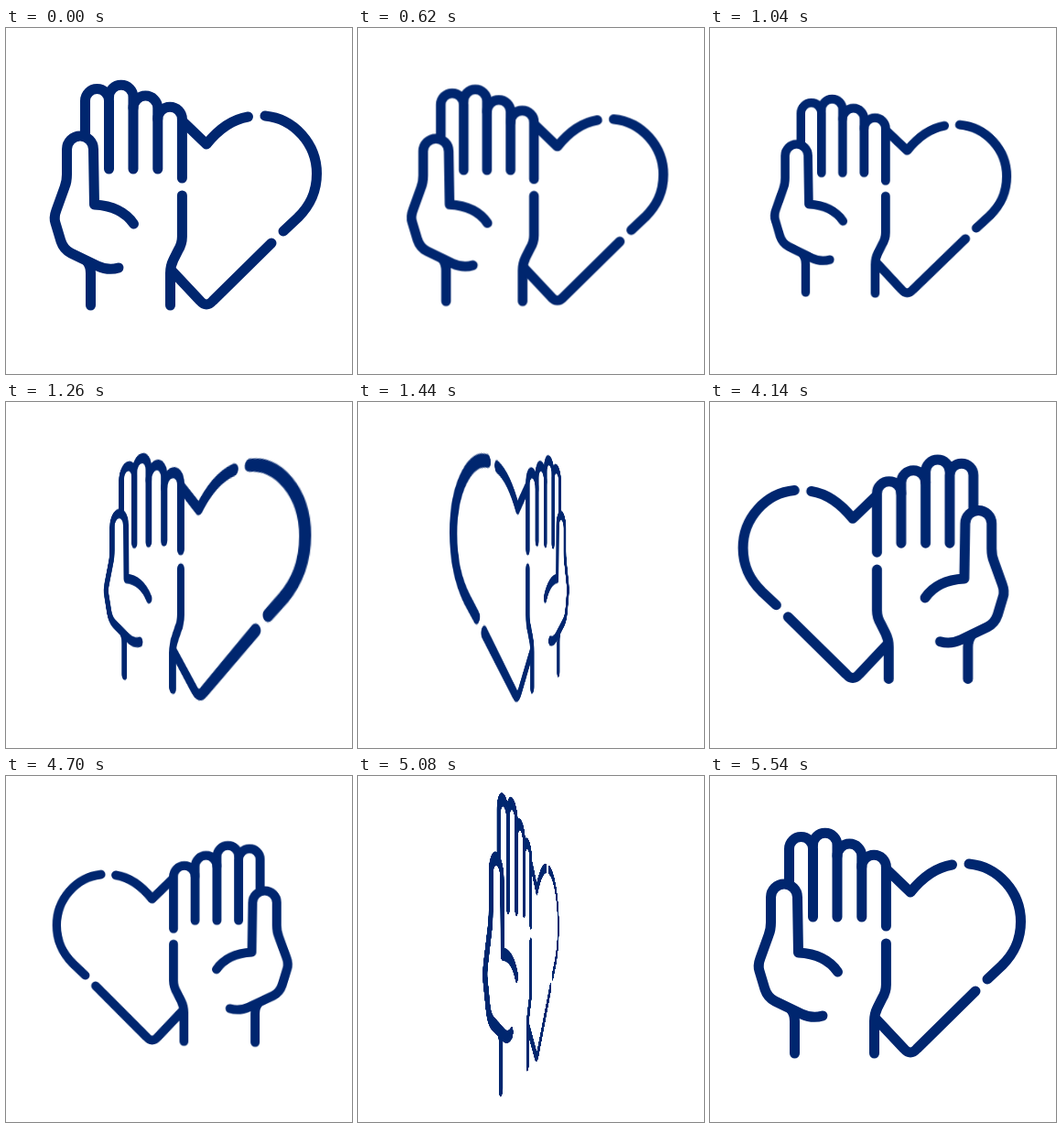
An HTML page for the animation above (5580 ms loop, 378x378 px).

```html
<!DOCTYPE html>
<html lang="en">
<head>
<meta charset="utf-8">
<title>Hand and heart</title>
<style>
  html, body { margin: 0; width: 100%; height: 100%; overflow: hidden; background: #fff; }
  svg {
    display: block; width: 378px; height: 378px; transform-origin: 187.4px 189px;
    fill: none; stroke: #00266f; stroke-width: 11; stroke-linecap: round; stroke-linejoin: round;
  }
</style>
</head>
<body>
<svg id="icon" viewBox="0 0 378 378">
  <!-- fingers -->
  <path d="M86.5 115V79.5a13 13 0 0 1 26 0V154"/>
  <path d="M112.5 75.5a13.25 13.25 0 0 1 26.5 0V154"/>
  <path d="M139 87.5a13.4 13.4 0 0 1 26.8 0V154"/>
  <path d="M165.8 99.5a13.3 13.3 0 0 1 26.6 0V164"/>
  <!-- thumb and palm -->
  <path d="M139.5 214C130 200 115 194 96.5 193L95.500 132.500a14.500 14.500 0 0 0-29 0V160Q66.500 168 64 174L55 199Q52 207 54 213L60 233Q63 242 71 246L100 260Q112 265.500 123 262"/>
  <!-- wrist -->
  <path d="M88.500 255Q92.500 260 92.500 268V303"/>
  <path d="M192.400 183V228Q192.400 236 188 243L183 253Q179.500 260 179.500 268V303"/>
  <!-- heart -->
  <path d="M193 102L219 127C231 112 246 100 264.500 97"/>
  <path d="M283 96C315 99 339.500 127 339.500 159C339.500 181 331 195 319 207L303 222"/>
  <path d="M290 235L226 298Q219 306 212 298L181 265"/>
</svg>
<script>
  const LOOP = 5580, FLIPS = [460, 4120];
  const icon = document.getElementById('icon');

  const progress = (t, from, to) => Math.min(1, Math.max(0, (t - from) / (to - from)));
  const ease = p => (1 - Math.cos(Math.PI * p)) / 2;

  // Half turn, t in ms since the flip began
  const turn = t => 180 * ease(progress(t, 510, 1330));

  // Shrink, spring up, hold, settle
  const growth = t =>
    -0.13 * progress(t, 0, 540)
    + 0.23 * ease(progress(t, 540, 790))
    - 0.10 * ease(progress(t, 1000, 1420));

  function draw(now) {
    const t = now % LOOP;
    let angle = 0, scale = 1;
    for (const start of FLIPS) {
      angle += turn(t - start);
      scale += growth(t - start);
    }
    icon.style.transform = `perspective(500px) scale(${scale.toFixed(5)}) rotateY(${-angle}deg)`;
  }

  const begin = performance.now();
  function tick() {
    draw(performance.now() - begin);
    requestAnimationFrame(tick);
  }
  tick();
</script>
</body>
</html>
```
